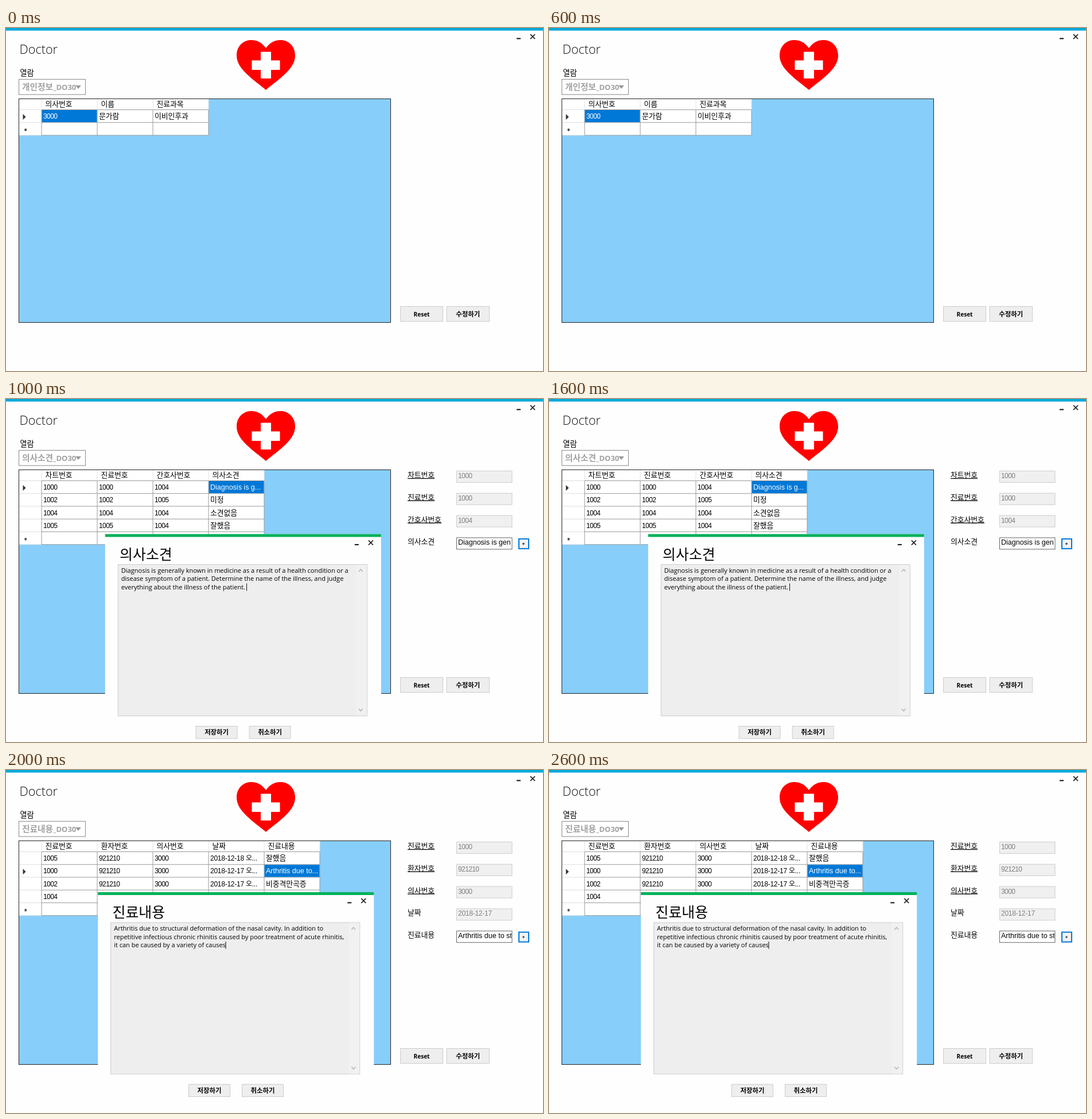
Animation of 936x598 px, one loop 3 s. Source, as an HTML page:

```html
<!DOCTYPE html>
<html lang="ko">
<head>
<meta charset="utf-8">
<title>Doctor</title>
<style>
  html, body { margin: 0; width: 100%; height: 100%; overflow: hidden; background: #fefefe; }
  #stage { display: block; width: 936px; height: 598px; }
  text { white-space: pre; font-family: "Liberation Sans", "Noto Sans CJK KR", sans-serif; font-size: 12.8px; fill: #000; }
  .latin { font-size: 12.5px; }
  .digits { font-size: 12px; letter-spacing: -.6px; }
  .date { font-size: 12px; letter-spacing: -.25px; }
  .white { fill: #fff; }
  .grey { fill: #808080; }
  .key { text-decoration: underline; }
  .title { font: 300 21.6px "Open Sans", "Noto Sans", sans-serif; fill: #111; }
  .view { font-size: 13.4px; }
  .combo { font: 700 13px "Open Sans", "Noto Sans CJK KR", sans-serif; fill: #a2a2a2; }
  .combo .ko { font-size: 14.7px; }
  .btn { font: 700 11.4px "Noto Sans CJK KR", sans-serif; text-anchor: middle; }
  .reset { font: 700 10.1px "Open Sans", sans-serif; text-anchor: middle; }
  .heading { font-size: 24.9px; }
  .note { font: 400 11px "Open Sans", "Noto Sans", sans-serif; }
</style>
</head>
<body>
<svg id="stage" viewBox="0 0 936 598"></svg>
<script>
const NS = 'http://www.w3.org/2000/svg';
const STEP = 1000;
const COL = 97, ROW = 22.25, LEFT = 62, TOP = 142.5, FIELD = 38.8;
const stage = document.getElementById('stage');

function add(parent, tag, attrs = {}, content) {
  const el = document.createElementNS(NS, tag);
  for (const k in attrs) el.setAttribute(k, attrs[k]);
  if (content !== undefined) el.textContent = content;
  return parent.appendChild(el);
}
const rect = (p, x, y, width, height, fill, stroke = 'none', sw = 1) =>
  add(p, 'rect', { x, y, width, height, fill, stroke, 'stroke-width': sw });
const line = (p, d, stroke, sw = 1) =>
  add(p, 'path', { d, stroke, 'stroke-width': sw, fill: 'none' });
const label = (p, x, y, str, cls = '') => add(p, 'text', { x, y, class: cls }, str);

// Style class for a value shown in a cell or field
const kind = s => /^\d+$/.test(s) ? 'digits' : /^\d+-/.test(s) ? 'date' : /^[A-Z]/.test(s) ? 'latin' : '';

function button(p, x, y, w, h, str, cls = 'btn') {
  rect(p, x, y, w, h, '#eee', '#ccc');
  label(p, x + w / 2, y + h / 2 + 4, str, cls);
}

function windowIcons(p, right, top) {
  const x = right - 18, y = top + 15;
  line(p, `M${x - 28} ${y + 3.4}h7`, '#111', 2);
  line(p, `M${x - 4} ${y - 4}l8 8m0-8l-8 8`, '#111', 1.7);
}

function drawBase(p) {
  rect(p, 0, 0, 936, 4.5, '#00aadb');
  windowIcons(p, 936, 0);
  label(p, 23.5, 45, 'Doctor', 'title');
  label(p, 24.3, 83, '열람', 'view');
  add(p, 'path', {
    fill: '#f00',
    d: 'M453 35C461 24 470 20.5 480 21C494 22 504 33 504 48C504 72 474 90 453 108' +
       'C432 90 402 72 402 48C402 33 412 22 426 21C436 20.5 445 24 453 35Z'
  });
  rect(p, 444, 41.5, 18, 46.5, '#fff');
  rect(p, 428.5, 56.5, 49, 16.5, '#fff');
  rect(p, 22.5, 89.5, 116, 26.5, '#fff', '#999', 1.2);
  add(p, 'path', { d: 'M121 100h10l-5 6z', fill: '#999' });
  rect(p, 22.4, 123.4, 648, 390, '#87cefa', '#222');
  button(p, 687.5, 485.5, 74, 26, 'Reset', 'reset');
  button(p, 768, 485.5, 74.5, 26, '수정하기');
}

function drawCombo(p, name) {
  const clip = add(p, 'svg', { x: 23, y: 90, width: 100, height: 26 });
  const t = label(clip, 5, 18, '', 'combo');
  add(t, 'tspan', { class: 'ko' }, name);
  add(t, 'tspan', {}, '_DO30');
}

function drawGrid(p, { heads, rows, current, selected }) {
  const right = LEFT + heads.length * COL;
  const bottom = TOP + (rows.length + 1) * ROW;
  rect(p, 23, 124, right - 23, bottom - 124, '#fff');
  for (let i = 0; i <= rows.length + 1; i++) {
    const y = TOP + i * ROW;
    line(p, `M23 ${y}H${LEFT}`, '#dedede');
    line(p, `M${LEFT} ${y}H${right}`, '#999');
  }
  for (let i = 0; i <= heads.length; i++) {
    const x = LEFT + i * COL;
    line(p, `M${x} 124V${TOP}`, '#e2e2e2');
    line(p, `M${x} ${TOP}V${bottom}`, '#999');
  }
  const sx = LEFT + selected * COL, sy = TOP + current * ROW;
  rect(p, sx + .5, sy + .5, COL - 1, ROW - 1, '#0078d7');
  heads.forEach((h, i) => label(p, LEFT + 6.5 + i * COL, 137, h));
  rows.forEach((row, r) => row.forEach((s, c) => {
    const lit = r === current && c === selected ? ' white' : '';
    label(p, LEFT + 3 + c * COL, 158 + r * ROW, s, kind(s) + lit);
  }));
  add(p, 'path', { d: `M29.5 ${sy + 7.5}l5 5l-5 5z`, fill: '#333' });
  const ny = bottom - 9.5;
  line(p, `M34.2 ${ny - 2.3}v4.6m-2-3.5l4 2.4m0-2.4l-4 2.4`, '#333', 1.3);
}

function drawForm(p, fields) {
  fields.forEach(([name, value], i) => {
    const y = 125.5 + i * FIELD, last = i === fields.length - 1;
    label(p, 700, y + 11.4, name, i < 3 ? 'key' : '');
    rect(p, 785.5, y, 96.5, 20, last ? '#fff' : '#f0f0f0', last ? '#666' : '#ccc');
    const clip = add(p, 'svg', { x: 786, y, width: 95, height: 20 });
    label(clip, 2, 12.5, value, kind(value) + (last ? '' : ' grey'));
    if (last) {
      rect(p, 894, y + 2, 17, 17, '#f2f2f2', '#0078d7', 2);
      line(p, `M900 ${y + 10.5}h4m-2-2v4`, '#222', 1.1);
    }
  });
}

function drawPopup(p, { x, y, title, lines, caret }) {
  const g = add(p, 'g', { transform: `translate(${x} ${y})` });
  rect(g, 0, 0, 481, 370, '#fefefe');
  rect(g, 0, 0, 481, 5, '#00b159');
  windowIcons(g, 481, 0);
  label(g, 25.3, 44.2, title, 'heading');
  rect(g, 22.5, 53, 434, 264, '#eee', '#ccc');
  rect(g, 437, 53.5, 19, 263, '#f1f1f1');
  line(g, 'M442 65.5l3.5-4l3.5 4M442 304.5l3.5 4l3.5-4', '#b8b8b8', 1.5);
  lines.forEach((s, i) => label(g, 28, 67 + i * 14.5, s, 'note'));
  line(g, `M${caret} 86v13`, '#111');
  button(g, 158.3, 335, 72, 21.5, '저장하기');
  button(g, 251.3, 335, 72, 21.5, '취소하기');
}

const scenes = [
  {
    combo: '개인정보',
    grid: {
      heads: ['의사번호', '이름', '진료과목'],
      rows: [['3000', '문가람', '이비인후과']],
      current: 0, selected: 0
    }
  },
  {
    combo: '의사소견',
    grid: {
      heads: ['차트번호', '진료번호', '간호사번호', '의사소견'],
      rows: [
        ['1000', '1000', '1004', 'Diagnosis is g...'],
        ['1002', '1002', '1005', '미정'],
        ['1004', '1004', '1004', '소견없음'],
        ['1005', '1005', '1004', '잘했음']
      ],
      current: 0, selected: 3
    },
    form: [['차트번호', '1000'], ['진료번호', '1000'], ['간호사번호', '1004'], ['의사소견', 'Diagnosis is gen']],
    popup: {
      x: 172.8, y: 235.5, title: '의사소견', caret: 246.7,
      lines: [
        'Diagnosis is generally known in medicine as a result of a health condition or a',
        'disease symptom of a patient. Determine the name of the illness, and judge',
        'everything about the illness of the patient.'
      ]
    }
  },
  {
    combo: '진료내용',
    grid: {
      heads: ['진료번호', '환자번호', '의사번호', '날짜', '진료내용'],
      rows: [
        ['1005', '921210', '3000', '2018-12-18 오...', '잘했음'],
        ['1000', '921210', '3000', '2018-12-17 오...', 'Arthritis due to...'],
        ['1002', '921210', '3000', '2018-12-17 오...', '비중격만곡증'],
        ['1004']
      ],
      current: 1, selected: 4
    },
    form: [['진료번호', '1000'], ['환자번호', '921210'], ['의사번호', '3000'], ['날짜', '2018-12-17'], ['진료내용', 'Arthritis due to structural']],
    popup: {
      x: 160.2, y: 213, title: '진료내용', caret: 222.8,
      lines: [
        'Arthritis due to structural deformation of the nasal cavity. In addition to',
        'repetitive infectious chronic rhinitis caused by poor treatment of acute rhinitis,',
        'it can be caused by a variety of causes'
      ]
    }
  }
];

drawBase(add(stage, 'g'));
const layers = scenes.map(s => {
  const g = add(stage, 'g');
  drawCombo(g, s.combo);
  drawGrid(g, s.grid);
  if (s.form) drawForm(g, s.form);
  if (s.popup) drawPopup(g, s.popup);
  return g;
});

const start = performance.now();
function tick() {
  const now = Math.floor((performance.now() - start) / STEP) % layers.length;
  layers.forEach((g, i) => g.setAttribute('visibility', i === now ? 'visible' : 'hidden'));
  requestAnimationFrame(tick);
}
tick();
</script>
</body>
</html>
```
